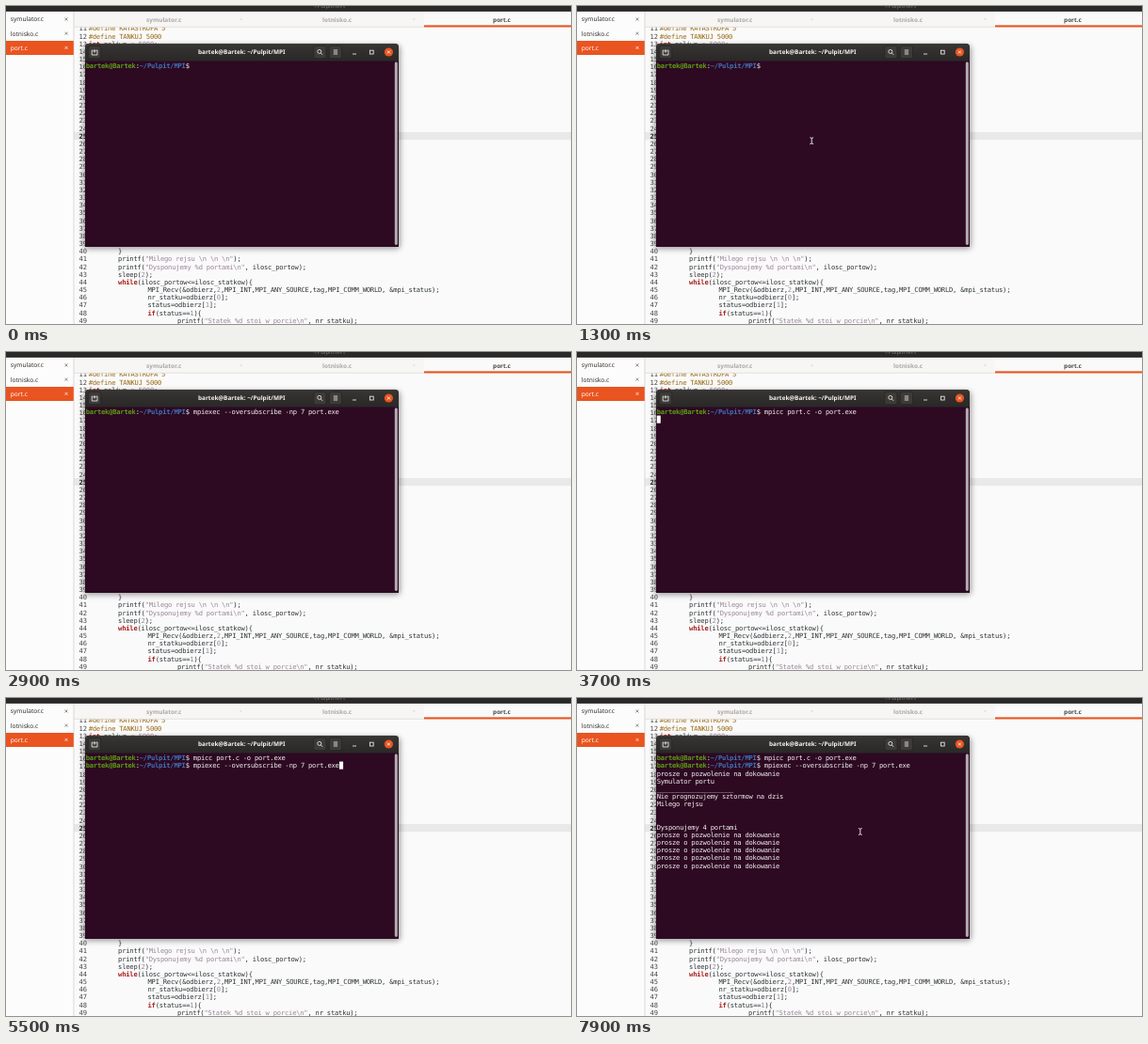
An HTML page for the animation above (8 s loop, 600 by 338 pixels).

```html
<!DOCTYPE html>
<html lang="pl">
<head>
<meta charset="utf-8">
<title>Terminal</title>
<style>
  html, body { margin: 0; width: 100%; height: 100%; overflow: hidden; background: #fafafa; }
  svg { display: block; width: 600px; height: 338px; }
  text { white-space: pre; text-rendering: geometricPrecision; }
  .mono { font: 7.1px "DejaVu Sans Mono", monospace; letter-spacing: -0.196px; }
  .ui { font: 6.6px "Noto Sans", sans-serif; }
  .b { font: bold 6.4px "Noto Sans", sans-serif; text-anchor: middle; }
  .code { fill: #2e3436; }
  .num { fill: #444; }
  .now { fill: #222; font-weight: bold; }
  .pre { fill: #96670f; }
  .str { fill: #9a859a; }
  .key { fill: #a8201f; font-weight: bold; }
  .user { fill: #5a9e14; font-weight: bold; }
  .path { fill: #4074b8; font-weight: bold; }
  .out { fill: #f4f2f3; }
  .line { fill: none; stroke: #e6e4e2; stroke-width: 0.9; }
</style>
</head>
<body>
<svg viewBox="0 0 600 338" xmlns="http://www.w3.org/2000/svg">
  <defs>
    <linearGradient id="bar" x2="0" y2="1">
      <stop offset="0" stop-color="#383633"/><stop offset="1" stop-color="#2a2827"/>
    </linearGradient>
    <filter id="soft" x="-10%" y="-10%" width="120%" height="125%">
      <feGaussianBlur stdDeviation="3"/>
    </filter>
  </defs>

  <rect width="600" height="338" fill="#fafafa"/>
  <rect x="72" y="134" width="528" height="8.2" fill="#e9e9e9"/>
  <g id="code"></g>

  <!-- editor tabs -->
  <rect x="72" y="5" width="528" height="17.6" fill="#f7f6f5"/>
  <rect x="444" y="5" width="156" height="17.6" fill="#fafafa"/>
  <path d="M72 22.3H444" stroke="#d5d2cf" stroke-width="0.6"/>
  <rect x="444" y="20.4" width="156" height="2.1" fill="#e95420"/>
  <g fill="#aba8a5">
    <text x="167.7" y="16.6" class="b">symulator.c</text>
    <text x="351.5" y="16.6" class="b">lotnisko.c</text>
    <text x="526.5" y="16.6" class="b" fill="#4a4846">port.c</text>
  </g>
  <path d="M248.4 13.2l2 2m0-2l-2 2M432.4 13.2l2 2m0-2l-2 2" stroke="#d2cfcc" stroke-width="0.6"/>

  <!-- file list -->
  <rect width="72" height="338" fill="#fcfcfc"/>
  <path d="M72 5V338" stroke="#d3d0cd" stroke-width="0.8"/>
  <rect y="37" width="71.8" height="15" fill="#e95420"/>
  <g id="files"></g>
  <rect width="600" height="5.9" fill="#2b2928"/>
  <text class="ui" x="342.5" y="2" text-anchor="middle" fill="#7d7a78" style="font-size:6px">~/Pulpit/MPI</text>

  <!-- terminal window -->
  <rect x="82.5" y="42" width="336" height="216" rx="4" fill="#000" opacity="0.38" filter="url(#soft)"/>
  <path d="M84 256V44q0-4 4-4H413q4 0 4 4V256z" fill="#2d0922"/>
  <path d="M84 58.5V44q0-4 4-4H413q4 0 4 4V58.5z" fill="url(#bar)"/>
  <path d="M88 40.3H413" stroke="#45423f" stroke-width="0.5"/>
  <g fill="#3d3b38" stroke="#232120" stroke-width="0.6">
    <rect x="87.3" y="42.3" width="13.4" height="13.4" rx="2"/>
    <rect x="326.8" y="42.3" width="13.2" height="13.4" rx="2"/>
    <rect x="343.3" y="42.3" width="13.2" height="13.4" rx="2"/>
  </g>
  <path class="line" d="M92 47H91.2V52H97V47H96M94 46v3.6M92.3 47.8H95.8"/>
  <circle class="line" cx="332.8" cy="48.4" r="2"/>
  <path class="line" d="M334.3 50l1.9 1.9M347.8 47h4.3M347.8 49h4.3M347.8 51h4.3M368 51h4"/>
  <rect class="line" x="386.4" y="47.2" width="3.8" height="3.8"/>
  <circle cx="406.4" cy="49" r="4.6" fill="#e95420"/>
  <path class="line" d="M404.9 47.5l3 3m0-3l-3 3" style="stroke:#fff"/>
  <text class="b" x="250.3" y="51.4" fill="#f5f3f1">bartek@Bartek: ~/Pulpit/MPI</text>
  <rect x="412.8" y="59.5" width="3" height="194.5" rx="1.4" fill="#b5adb1"/>

  <rect id="caret" width="4.1" height="8.1" fill="#fff"/>
  <g id="term"></g>
  <path id="beam" d="M-1.9-3.4Q0-3.4 0-2.4Q0-3.4 1.9-3.4M0-2.6V2.6M-1.9 3.4Q0 3.4 0 2.4Q0 3.4 1.9 3.4" fill="none" stroke="#e3dde1" stroke-width="1"/>
</svg>
<script>
const CELL = 4.08, ROW = 8.165, TAB = 31.4, LEFT = 84.7, LOOP = 8000;
const $ = id => document.getElementById(id);
const esc = s => s.replace(/&/g, '&amp;').replace(/</g, '&lt;');
const span = (cls, s) => `<tspan class="${cls}">${esc(s)}</tspan>`;
const text = (cls, x, y, body) => `<text class="${cls}" x="${x}" y="${y.toFixed(2)}">${body}</text>`;

// editor content: line number -> [indent, code]
const source = {
  11: [0, '#define KATASTROFA 5'],
  12: [0, '#define TANKUJ 5000'],
  13: [0, 'int paliwo = 5000;'],
  40: [1, '}'],
  41: [1, 'printf("Milego rejsu \\n \\n \\n");'],
  42: [1, 'printf("Dysponujemy %d portami\\n", ilosc_portow);'],
  43: [1, 'sleep(2);'],
  44: [1, 'while(ilosc_portow<=ilosc_statkow){'],
  45: [2, 'MPI_Recv(&odbierz,2,MPI_INT,MPI_ANY_SOURCE,tag,MPI_COMM_WORLD, &mpi_status);'],
  46: [2, 'nr_statku=odbierz[0];'],
  47: [2, 'status=odbierz[1];'],
  48: [2, 'if(status==1){'],
  49: [3, 'printf("Statek %d stoi w porcie\\n", nr_statku);']
};

function paint(code) {
  if (code[0] === '#') return span('pre', code);
  return code.split(/("[^"]*"|\b(?:while|if|int|\d+)\b)/).map((s, i) =>
    i % 2 ? span(/^["\d]/.test(s) ? 'str' : 'key', s) : esc(s)).join('');
}

let html = '';
for (let n = 11; n < 50; n++) {
  const y = 26.4 + (n - 11) * ROW;
  html += text(n === 25 ? 'mono now' : 'mono num', 77.6, y, n);
  if (source[n]) html += text('mono code', 87.7 + source[n][0] * TAB, y, paint(source[n][1]));
}
$('code').innerHTML = html;

$('files').innerHTML = ['symulator.c', 'lotnisko.c', 'port.c'].map((name, i) => {
  const y = 14 + i * 15.2, on = i === 2;
  return `<text class="ui" x="4.8" y="${y + 2.4}" fill="${on ? '#fff' : '#33302e'}">${name}</text>` +
    `<path d="M62.5 ${y - 1.5}l3 3m0-3l-3 3" stroke="${on ? '#fff' : '#6b6866'}" stroke-width="0.7"/>`;
}).join('');

const PROMPT = 28;
const compile = 'mpicc port.c -o port.exe';
const run = 'mpiexec --oversubscribe -np 7 port.exe';
const ask = 'prosze o pozwolenie na dokowanie';
const output = [ask, 'Symulator portu', '_'.repeat(20), 'Nie prognozujemy sztormow na dzis',
  'Milego rejsu', '', '', 'Dysponujemy 4 portami', ask, ask, ask, ask, ask];
const cmd = s => ({ cmd: s });

// each step: start time, rows on screen; the last row holds the caret
const steps = [
  [-700, [cmd('')]],
  [1800, [cmd('clear')]],
  [2300, [cmd(run)]],
  [3200, [cmd(compile)]],
  [3700, [cmd(compile), '']],
  [3800, [cmd(compile), cmd('')]],
  [4600, [cmd(compile), cmd(compile)]],
  [4800, [cmd(compile), cmd('clear')]],
  [5000, [cmd(compile), cmd(run)]],
  [6900, [cmd(compile), cmd(run), '']],
  [7200, [cmd(compile), cmd(run), ...output, '']]
];

const rowBody = r => r.cmd === undefined ? esc(r) :
  span('user', 'bartek@Bartek') + ':' + span('path', '~/Pulpit/MPI') + '$ ' + esc(r.cmd);

let shown = null;
function draw(t) {
  const step = steps.filter(s => s[0] <= t).pop();
  const [start, rows] = step;
  if (step !== shown) {
    shown = step;
    $('term').innerHTML = rows.map((r, i) => text('mono out', LEFT, 66.2 + i * ROW, rowBody(r))).join('');
    const last = rows[rows.length - 1];
    const col = last.cmd === undefined ? 0 : PROMPT + last.cmd.length;
    $('caret').setAttribute('x', LEFT + col * CELL);
    $('caret').setAttribute('y', 59.4 + (rows.length - 1) * ROW);
  }
  $('caret').style.display = (t - start) % 1200 < 600 ? '' : 'none';

  const early = t >= 100 && t < 1800;
  $('beam').style.display = early || t >= 7500 ? '' : 'none';
  $('beam').setAttribute('transform', early ? 'translate(249.2 143.3)' : 'translate(300.8 142)');
}

const t0 = performance.now();
function tick() {
  draw((performance.now() - t0) % LOOP);
  requestAnimationFrame(tick);
}
draw(0);
requestAnimationFrame(tick);
</script>
</body>
</html>
```
